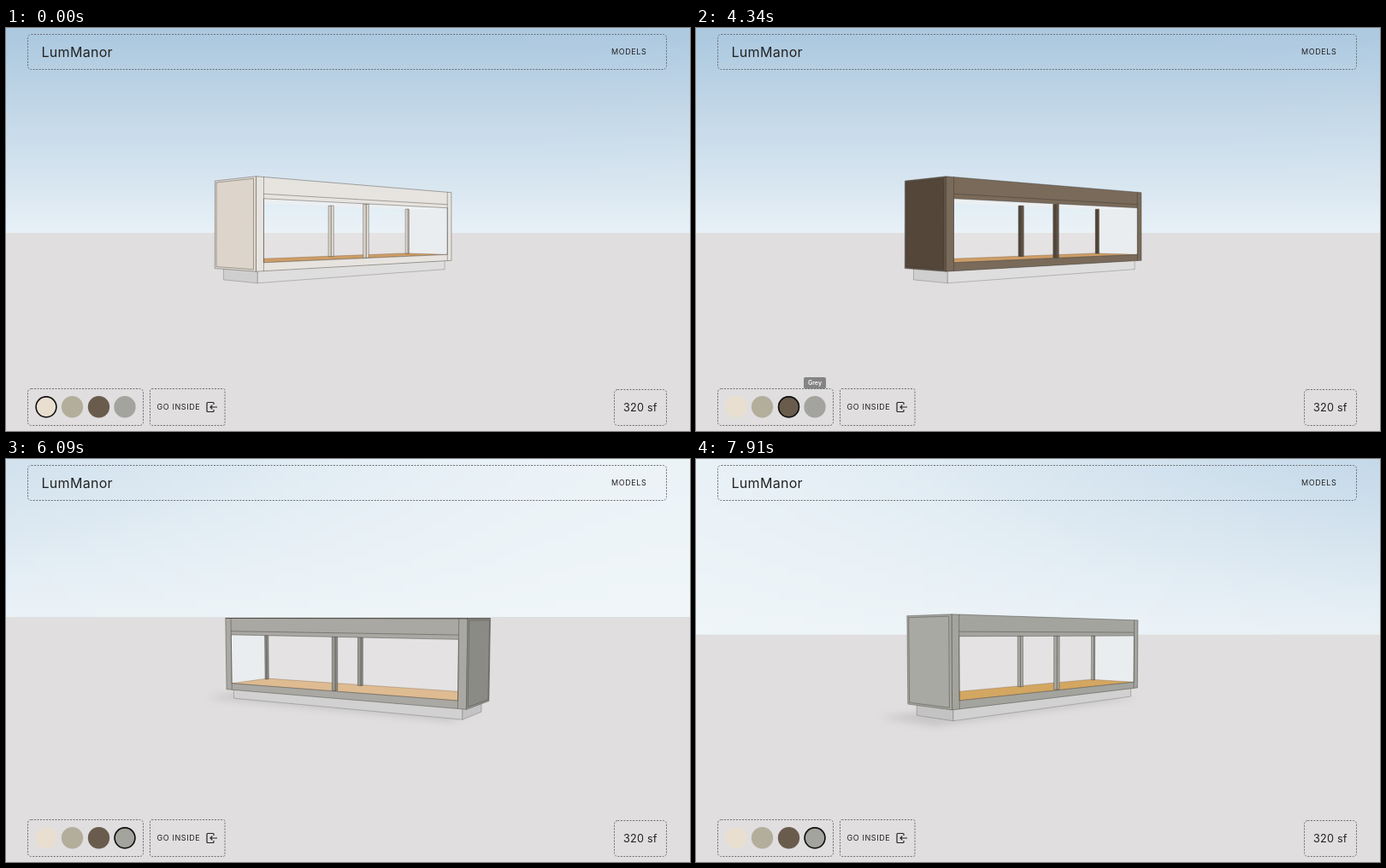
An HTML page with a canvas that plays this animation: 800 by 472 pixels, repeating every 7.98 s.

```html
<!DOCTYPE html>
<html lang="en">
<head>
<meta charset="utf-8">
<title>LumManor</title>
<style>
  html, body { margin: 0; width: 100%; height: 100%; overflow: hidden; background: #e0dedf; }
  canvas, svg { position: absolute; left: 0; top: 0; width: 800px; height: 472px; }
  text { font-family: Inter, "Open Sans", sans-serif; fill: #222; }
  .box { fill: none; stroke: #6c7074; stroke-width: 1; stroke-dasharray: 2 1.5; }
  .caps { font-size: 9px; letter-spacing: .6px; }
  .tip { opacity: 0; }
  .tip rect { fill: rgba(97, 97, 97, .9); }
  .tip text { fill: #fff; font-size: 7px; font-weight: 600; text-anchor: middle; }
  .icon { fill: none; stroke: #222; stroke-width: 1.2; }
  .ring { fill: none; stroke: #111; stroke-width: 1.6; }
</style>
</head>
<body>
<canvas id="view" width="800" height="472"></canvas>
<svg viewBox="0 0 800 472">
  <rect class="box" x="25.5" y="7.5" width="747" height="41" rx="4"/>
  <rect class="box" x="25.5" y="422.5" width="135" height="43" rx="4"/>
  <rect class="box" x="168.5" y="422.5" width="87.5" height="43" rx="2"/>
  <rect class="box" x="711.5" y="423.5" width="61" height="42" rx="4"/>
  <text x="41.5" y="33.5" font-size="16" letter-spacing=".3">LumManor</text>
  <text class="caps" x="708" y="31.3">MODELS</text>
  <text class="caps" x="176.5" y="447.2">GO INSIDE</text>
  <text x="722" y="448.6" font-size="12.7" letter-spacing=".2">320 sf</text>
  <path class="icon" d="M243 441v-1.5a1 1 0 0 0-1-1h-6a1 1 0 0 0-1 1v9a1 1 0 0 0 1 1h6a1 1 0 0 0 1-1V447M247 444h-8M241.3 441.7L239 444l2.3 2.3"/>
  <g id="swatches"></g>
  <circle class="ring" id="ring" cy="443.8" r="11.9"/>
</svg>
<script>
const LOOP = 7980;
const ctx = document.getElementById('view').getContext('2d');
const ring = document.getElementById('ring');

// Finishes: picked = click time, hover = [enter, leave]
const finishes = [
  { name: 'White', x: 47, w: 30, swatch: '#e9dfd0', picked: 0, hover: [1730, 1960],
    front: [231, 227, 222], side: [221, 213, 204] },
  { name: 'Beige', x: 77.5, w: 30, swatch: '#b3ae9c', picked: 2450, hover: [1960, 2960],
    front: [200, 196, 180], side: [167, 161, 145] },
  { name: 'Brown', x: 108.5, w: 32, swatch: '#6a5c4d', picked: 3570, hover: [3290, 4060],
    front: [121, 106, 90], side: [84, 71, 58] },
  { name: 'Grey', x: 139, w: 26, swatch: '#a4a49e', picked: 4480, hover: [4160, 4710] }
];

document.getElementById('swatches').innerHTML = finishes.map(f => `
  <circle cx="${f.x}" cy="443.8" r="12.7" fill="${f.swatch}"/>
  <g class="tip"><rect x="${f.x - f.w / 2}" y="409" width="${f.w}" height="13.5" rx="2"/>
  <text x="${f.x}" y="418.3">${f.name}</text></g>`).join('');
const tips = document.querySelectorAll('.tip');

const clamp = v => Math.max(0, Math.min(1, v));
const rgb = c => `rgb(${c.map(Math.round)})`;
const mix = (a, b, k) => a.map((v, i) => v + (b[i] - v) * k);
const shade = (c, k) => c.map(v => v * k);

function track(t, keys) {
  if (t <= keys[0][0]) return keys[0][1];
  for (let i = 1; i < keys.length; i++) {
    const [t0, a] = keys[i - 1], [t1, b] = keys[i];
    if (t < t1) return mix(a, b, (t - t0) / (t1 - t0));
  }
  return keys[keys.length - 1][1];
}

function hermite(t, t0, t1, a, b, va, vb) {
  const d = t1 - t0, u = (t - t0) / d, u2 = u * u, u3 = u2 * u;
  return a * (2 * u3 - 3 * u2 + 1) + b * (3 * u2 - 2 * u3)
    + d * (va * (u3 - 2 * u2 + u) + vb * (u3 - u2));
}

// Slow drag, quick flick, then damped coasting
const T0 = 5040, T1 = 5600, T2 = 6090, DAMP = 655;
const coast = t => Math.exp(-(t - T2) / DAMP);
function heading(t) {
  if (t < T0) return 45.3;
  if (t < T1) return hermite(t, T0, T1, 45.3, 50.3, 0, .04);
  if (t < T2) return hermite(t, T1, T2, 50.3, 148.5, .04, .129);
  return 233 - 84.5 * coast(t);
}
function horizonAt(t) {
  if (t < T0) return 240;
  if (t < T1) return hermite(t, T0, T1, 240, 237, 0, -.01);
  if (t < T2) return hermite(t, T1, T2, 237, 185, -.01, .033);
  return 207 - 22 * coast(t);
}

// Units: one wall height
const F = 699, R = 7.8, TARGET = .45;
const HX = 1.765, HZ = .39, COL = .1, SILL = .09, HEAD = .77, BAND = .82, IN = 1.65;
let cam;

function setCamera(t) {
  const deg = heading(t), horizon = horizonAt(t);
  const pitch = Math.atan((236 - horizon) / F);
  // The house is the same from both long sides
  const a = (deg > 90 ? deg - 180 : deg) * Math.PI / 180;
  const s = Math.sin(a), c = Math.cos(a), ce = Math.cos(pitch), se = Math.sin(pitch);
  cam = { deg, horizon, pitch, s, c, ce, se,
    x: -R * ce * s, y: TARGET + R * se, z: R * ce * c };
}

function project([x, y, z]) {
  const w = x * cam.s - z * cam.c, h = y - TARGET;
  const d = R + w * cam.ce - h * cam.se;
  return [400 + F * (x * cam.c + z * cam.s) / d, 236 - F * (h * cam.ce + w * cam.se) / d];
}

function trace(points) {
  points.map(project).forEach((p, i) => i ? ctx.lineTo(...p) : ctx.moveTo(...p));
  ctx.closePath();
}
function poly(points, fill, stroke) {
  ctx.beginPath();
  trace(points);
  if (fill) { ctx.fillStyle = fill; ctx.fill('evenodd'); }
  if (stroke) { ctx.strokeStyle = stroke; ctx.stroke(); }
}
function line(a, b, stroke) {
  ctx.beginPath();
  ctx.moveTo(...project(a));
  ctx.lineTo(...project(b));
  ctx.strokeStyle = stroke;
  ctx.stroke();
}
const wallX = (x, z0, z1, y0, y1) => [[x, y0, z0], [x, y0, z1], [x, y1, z1], [x, y1, z0]];
const wallZ = (z, x0, x1, y0, y1) => [[x0, y0, z], [x1, y0, z], [x1, y1, z], [x0, y1, z]];
const flat = (y, x0, x1, z) => [[x0, y, -z], [x1, y, -z], [x1, y, z], [x0, y, z]];

function box(x0, x1, z0, z1, y0, y1, front, side, edge) {
  if (cam.z > z1) poly(wallZ(z1, x0, x1, y0, y1), front, edge);
  if (cam.x < x0) poly(wallX(x0, z0, z1, y0, y1), side, edge);
  if (cam.x > x1) poly(wallX(x1, z0, z1, y0, y1), side, edge);
}

// Sky dome: bluer with height, washed out near the sun
const SKY_W = 80, SKY_H = 26, SUN = 181;
const dome = document.createElement('canvas');
dome.width = SKY_W;
dome.height = SKY_H;
const domeCtx = dome.getContext('2d');
const pixels = domeCtx.createImageData(SKY_W, SKY_H);

function drawSky() {
  const deg = 180 / Math.PI;
  for (let i = 0; i < SKY_W; i++) {
    const dir = cam.deg + Math.atan((i * 10 - 395) / F) * deg;
    const u = clamp(Math.abs(dir - SUN) / 120);
    const clear = .08 + .92 * u * u * (3 - 2 * u);
    for (let j = 0; j < SKY_H; j++) {
      const up = Math.max(0, (Math.atan((231 - j * 10) / F) - cam.pitch) * deg);
      const c = mix([240, 246, 249], [173, 201, 224], clamp((.12 + .048 * up) * clear));
      pixels.data.set([...c, 255], (j * SKY_W + i) * 4);
    }
  }
  domeCtx.putImageData(pixels, 0, 0);
  ctx.drawImage(dome, 0, 0, 800, 260);
  ctx.fillStyle = '#e0dedf';
  ctx.fillRect(0, cam.horizon, 800, 472);
}

function drawHouse(t, front, side) {
  const edge = 'rgba(48,45,40,.48)', soft = 'rgba(60,58,55,.35)';
  const post = rgb(side), postLit = rgb(mix(front, side, .6));
  ctx.lineWidth = .8;

  // Shadow falls away from the sun, past one end of the house
  const dark = clamp((cam.y - .42) / .4);
  if (dark) {
    ctx.filter = 'blur(4px)';
    poly(flat(-.13, -HX - .3, HX - .15, HZ + .1), `rgba(110,108,108,${.22 * dark})`);
    ctx.filter = 'none';
  }
  const base = t < T1 ? 1 : 1 - .06 * clamp((t - T1) / 490);
  box(-HX + .07, HX - .07, -HZ + .07, HZ - .07, -.13, 0,
    rgb(shade([223, 222, 222], base)), rgb(shade([208, 207, 207], base)), soft);

  // Room
  const hole = wallZ(HZ, -HX + COL, HX - COL, SILL, HEAD);
  if (cam.z > HZ) poly(hole, 'rgba(255,255,255,.13)');
  const floor = track(t, [[T1, [205, 157, 103]], [T2, [222, 187, 145]],
    [6860, [221, 185, 142]], [7910, [211, 167, 98]]]);
  if (cam.y < HEAD) poly(flat(HEAD, -HX + COL, HX - COL, HZ), '#eceff1');
  for (const x of [-IN, IN])
    if (cam.x * Math.sign(x) < IN) poly(wallX(x, -HZ, HZ, SILL, HEAD), '#eaedef', 'rgba(255,255,255,.5)');
  poly(flat(SILL, -HX + COL, HX - COL, HZ), rgb(floor), 'rgba(110,80,50,.4)');
  const back = -HZ + .07;
  for (const x of [-1.615, 0, 1.615]) {
    const w = x ? .014 : .025;
    box(x - w, x + w, back - .025, back + .025, SILL, HEAD, postLit, post, edge);
  }

  if (cam.z > HZ) {
    box(-.025, .025, HZ - .095, HZ - .045, SILL, HEAD, postLit, post, edge);
    ctx.beginPath();
    trace(wallZ(HZ, -HX, HX, 0, 1));
    trace(hole);
    ctx.fillStyle = rgb(front);
    ctx.fill('evenodd');
    ctx.strokeStyle = edge;
    ctx.stroke();
    for (const x of [-HX + COL, HX - COL]) line([x, 0, HZ], [x, 1, HZ], edge);
    line([-HX + COL, BAND, HZ], [HX - COL, BAND, HZ], edge);
  }
  for (const x of [-HX, HX]) {
    if (cam.x * Math.sign(x) < HX) continue;
    poly(wallX(x, -HZ, HZ, 0, 1), rgb(mix(side, front, .35)), edge);
    poly(wallX(x, -HZ + .03, HZ - .045, .02, .98), rgb(side), edge);
  }
  if (cam.y > 1) poly(flat(1, -HX, HX, HZ), rgb(shade(side, .8)), edge);
}

function render(now) {
  const t = now % LOOP;
  const pick = finishes.filter(f => t >= f.picked).pop();
  let { front, side } = pick;
  if (!front) {
    const grey = v => [v, v - .5, v - 6];
    front = grey(track(t, [[T1, [193]], [T2, [169]], [6860, [162]], [7910, [164]]])[0]);
    side = grey(track(t, [[T1, [141]], [T2, [139]], [6860, [160]], [7910, [169]]])[0]);
  }
  setCamera(t);
  drawSky();
  drawHouse(t, front, side);

  ring.setAttribute('cx', pick.x);
  finishes.forEach(({ hover: [enter, leave] }, i) => {
    tips[i].style.opacity = .84 * Math.min(clamp((t - enter) / 190), 1 - clamp((t - leave) / 150));
  });
}

const start = performance.now();
function tick() {
  render(performance.now() - start);
  requestAnimationFrame(tick);
}
tick();
</script>
</body>
</html>
```
